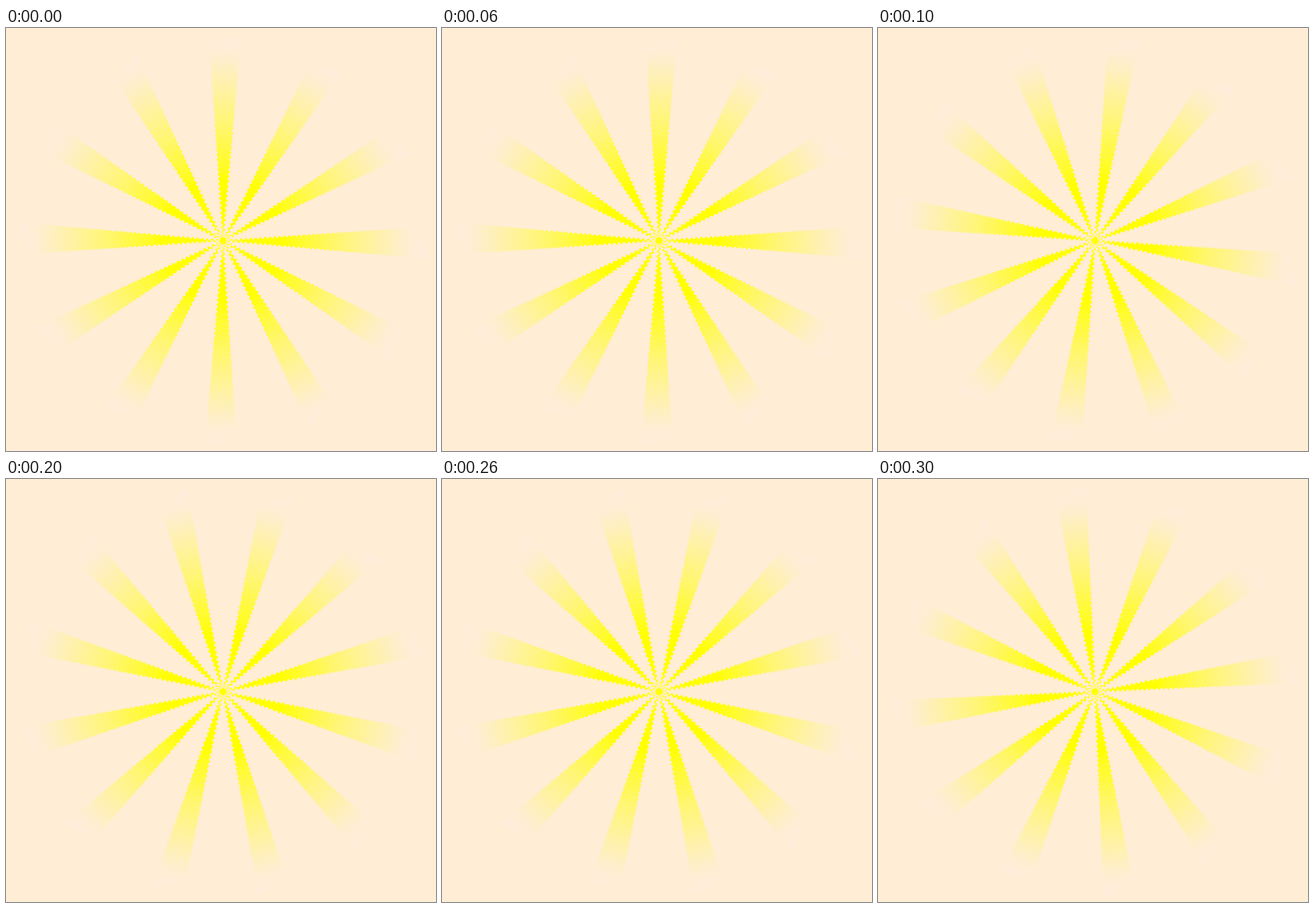
An HTML page for the animation above (400 ms loop, 755 px wide and 742 px high).

```html
<!DOCTYPE html>
<html lang="en">
<head>
<meta charset="utf-8">
<title>Turning sun rays</title>
<style>
  html, body { margin: 0; width: 100%; height: 100%; overflow: hidden; background: #ffedd5; }
  svg { display: block; width: 100%; height: 100%; }
</style>
</head>
<body>
<svg viewBox="0 0 755 742">
  <defs>
    <radialGradient id="glow" gradientUnits="userSpaceOnUse" cx="0" cy="0" r="362">
      <stop offset="0.29" stop-color="#ff0"/>
      <stop offset="0.345" stop-color="#fffc20"/>
      <stop offset="0.56" stop-color="#fff671"/>
      <stop offset="0.837" stop-color="#ffefc2"/>
      <stop offset="0.915" stop-color="#ffedd5"/>
      <stop offset="1" stop-color="#ffecdc"/>
    </radialGradient>
  </defs>
  <g transform="translate(381 373)" shape-rendering="crispEdges">
    <path id="rays" fill="url(#glow)"/>
    <circle r="6" fill="#ff0"/>
  </g>
</svg>
<script>
const RAYS = 12;
const HALF_WIDTH = 4.5 * Math.PI / 180;
const TILT = 0.6 * Math.PI / 180;
const RIPPLE = 8.5;

// Ripples swing each ray sideways, more weakly towards its tip.
function edgePoint(angle, r) {
  const swing = 2.2 * (1 - r / 380) * Math.sin(2 * Math.PI * r / RIPPLE);
  const a = angle + swing / Math.max(r, 2);
  return `${(r * Math.sin(a)).toFixed(2)} ${(-r * Math.cos(a)).toFixed(2)}`;
}

function edge(angle, length) {
  return Array.from({ length }, (_, i) => edgePoint(angle, i + 1));
}

// The tip is slanted: the leading edge is the longer one.
function rayPath(angle) {
  const trailing = edge(angle - HALF_WIDTH, 343);
  const leading = edge(angle + HALF_WIDTH, 361).reverse();
  return `M${trailing.concat(leading).join("L")}Z`;
}

const rays = document.getElementById("rays");
rays.setAttribute("d", Array.from({ length: RAYS },
  (_, i) => rayPath(TILT + i * 2 * Math.PI / RAYS)).join(""));

rays.animate(
  [{ transform: "rotate(0deg)" }, { transform: "rotate(30deg)" }],
  { duration: 400, iterations: Infinity, easing: "steps(4, end)" }
);
</script>
</body>
</html>
```
